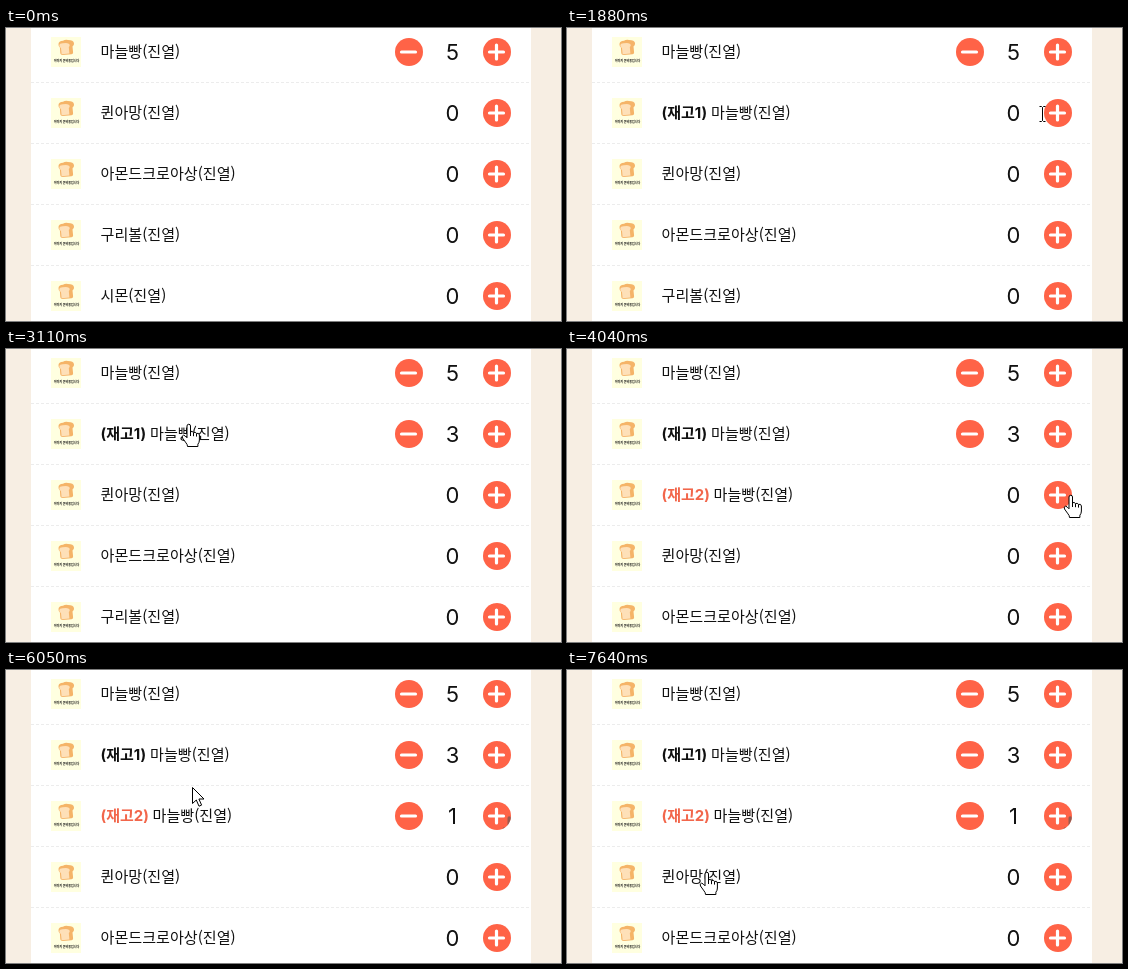
Write an HTML page that moves like this. It is 555 px wide and 293 px high and loops after 8000 ms.

```html
<!DOCTYPE html>
<html lang="ko">
<head>
<meta charset="utf-8">
<style>
  html, body { margin: 0; width: 100%; height: 100%; overflow: hidden; background: #f7eee3; }
  svg { display: block; width: 555px; height: 293px; }
  text { fill: #111; font: 15.1px "Noto Sans CJK KR", "Noto Sans CJK", sans-serif; }
  .tag { font: 700 15px Inter, "Noto Sans CJK KR", "Noto Sans CJK", sans-serif; }
  .count { font: 22px Inter, sans-serif; text-anchor: middle; }
  .caption { font-size: 3px; font-weight: 900; text-anchor: middle; }
  .sign { stroke: #fff; stroke-width: 3.2; stroke-linecap: round; fill: none; }
  .cursor { fill: #fff; stroke: #000; stroke-linejoin: round; }
</style>
</head>
<body>
<svg viewBox="0 0 555 293">
  <defs>
    <g id="thumb">
      <rect x="45" y="-15" width="30" height="30" fill="#ffffe0"/>
      <path d="M52.500-8q0-3 4.500-3.200q2-1.300 5-.8q5.500 0 6 3.200q.3 2-1.500 3.200l.6 6q0 1.500-1.600 1.800l-9 .8q-2 0-2.200-1.800l-.4-5.600q-1.600-1-1.400-3.600z" fill="#f5b468"/>
      <path d="M53.300-6.500q.2-2.300 3.400-2.300q5.800-1 6.900 1.200q.5 1.700-.8 2.600l.6 6.400l-7.800.9l-.6-6.300q-1.700-.7-1.700-2.500z" fill="#fee0b8"/>
      <text class="caption" x="60.500" y="9.700">이미지 준비중입니다</text>
    </g>
    <g id="plus">
      <circle cx="491" r="14" fill="#ff6347"/>
      <path class="sign" d="M483.500 0h14M490.500-7v14"/>
    </g>
    <g id="minus">
      <circle cx="403" r="14" fill="#ff6347"/>
      <path class="sign" d="M395.500 0h14"/>
    </g>
    <path id="palm" d="M-1.500 13V2a1.750 1.750 0 0 1 3.500 0V8q1.600-1.600 3 .6q1.800-1 3 .8q2.600-.8 2.900 1.600V16q0 2.500-1.500 4.200V22.500H-1q0-2-1.500-3.600L-6 14q-1-2.400 1-2.800q1.400 0 3.500 2.600z"/>
    <clipPath id="disc"><circle cx="491" r="14"/></clipPath>
  </defs>
  <rect x="25" width="500" height="293" fill="#fff"/>
  <path d="M25 54.500h500m-500 61h500m-500 61h500m-500 61h500" stroke="#ececec" stroke-dasharray="3 2"/>
  <g id="list"></g>
  <g id="hand" class="cursor">
    <g transform="translate(-.5 -1)">
      <use href="#palm"/>
      <path d="M2 8v4M5 8.800v3.400M8 9.600v3" fill="none"/>
    </g>
  </g>
  <path id="arrow" class="cursor" d="M.5.5V16.500L4.300 13L7 19.200L9.600 18.100L6.900 12H12Z"/>
  <path id="beam" class="cursor" d="M-2.500-7.500h2l1 1 1-1h2M.5-6.500v13M-2.500 7.500h2l1-1 1 1h2" style="fill:none"/>
</svg>
<script>
const LOOP = 8000, ROW = 61, TOP = 24;
const $ = id => document.getElementById(id);

// from: time the row is inserted; clicks: times its count goes up
const items = [
  { name: '마늘빵', base: 5 },
  { name: '마늘빵', tag: '(재고1)', x: 144, from: 1200, clicks: [2280, 2420, 2560] },
  { name: '마늘빵', tag: '(재고2)', x: 146.5, from: 3180, clicks: [4310], color: '#f2664b', shade: 4510 },
  { name: '퀸아망' },
  { name: '아몬드크로아상' },
  { name: '구리볼' },
  { name: '시몬' }
];

// Cursor strokes: start, end, steps, then evenly spaced points
const strokes = [
  [130, 670, 9, [442, 241, 'arrow'], [300, 90, 'arrow'], [150, 1, 'arrow'], [94, 14, 'hand'], [102, 17, 'hand']],
  [1200, 1880, 10, [102, 17, 'hand'], [160, 25, 'hand'], [300, 50, 'arrow'], [425, 78, 'beam'], [475, 86, 'beam']],
  [2080, 2140, 2, [479, 84, 'hand'], [481, 84, 'hand']],
  [2700, 3030, 6, [455, 83, 'beam'], [300, 74, 'arrow'], [194, 70, 'arrow']],
  [3110, 3700, 8, [183, 76, 'hand'], [190, 78, 'hand'], [350, 115, 'arrow'], [509, 147, 'arrow']],
  [3840, 4170, 5, [510, 148, 'arrow'], [504, 147, 'hand'], [504, 147, 'hand'], [498, 147, 'hand']],
  [4510, 4700, 4, [488, 148, 'hand'], [400, 144, 'arrow'], [290, 139, 'arrow'], [204, 134, 'arrow']],
  [4765, 4900, 3, [201, 134, 'arrow'], [194, 134, 'arrow']],
  [5040, 5250, 3, [193, 134, 'arrow'], [192, 133, 'arrow']],
  [5650, 5710, 2, [187, 133, 'hand'], [187, 133, 'arrow']],
  [6050, 6250, 4, [186, 117, 'arrow'], [188, 70, 'arrow']],
  [6450, 6910, 7, [190, 66, 'arrow'], [175, 36, 'arrow'], [152, 14, 'arrow']],
  [7170, 7240, 2, [147, 10, 'hand'], [146, 14, 'arrow']],
  [7380, 7640, 5, [146, 40, 'arrow'], [141, 110, 'arrow'], [138, 170, 'arrow'], [140, 203, 'hand']]
];

for (const item of items) {
  const row = document.createElementNS('http://www.w3.org/2000/svg', 'g');
  row.innerHTML = `<use href="#thumb"/>
    ${item.tag ? `<text class="tag" x="94.500" y="5" style="fill:${item.color || '#111'}">${item.tag}</text>` : ''}
    <text x="${item.x || 94.5}" y="5">${item.name}(진열)</text>
    <use class="less" href="#minus"/>
    <text class="count" x="446.500" y="8"></text>
    <use href="#plus"/>
    ${item.shade ? '<g class="shade" clip-path="url(#disc)"><use href="#palm" x="503" fill="#555" fill-opacity=".6"/></g>' : ''}`;
  item.row = row;
  item.less = row.querySelector('.less');
  item.count = row.querySelector('.count');
  item.shadow = row.querySelector('.shade');
  $('list').append(row);
}

const show = (el, on) => { el.style.display = on ? '' : 'none'; };

function drawList(t) {
  let slot = 0;
  for (const { row, less, count, shadow, base = 0, from = 0, clicks = [], shade } of items) {
    show(row, t >= from);
    if (t < from) continue;
    row.setAttribute('transform', `translate(0 ${TOP + ROW * slot++})`);
    const n = base + clicks.filter(c => t >= c).length;
    if (count.textContent !== String(n)) count.textContent = n;
    show(less, n > 0);
    if (shadow) show(shadow, t >= shade);
  }
}

function cursorAt(t) {
  const stroke = strokes.filter(s => t >= s[0]).pop();
  if (!stroke) return null;
  const [start, end, steps, ...pts] = stroke;
  const done = Math.min(1, (t - start) / (end - start));
  const u = Math.floor(done * (steps - 1) + 1e-6) / (steps - 1) * (pts.length - 1);
  const i = Math.min(Math.floor(u), pts.length - 2), f = u - i;
  const [a, b] = [pts[i], pts[i + 1]];
  return {
    x: Math.round(a[0] + (b[0] - a[0]) * f),
    y: Math.round(a[1] + (b[1] - a[1]) * f),
    kind: (f < 0.5 ? a : b)[2]
  };
}

function drawCursor(t) {
  const c = cursorAt(t);
  for (const kind of ['hand', 'arrow', 'beam']) {
    const on = c !== null && c.kind === kind;
    show($(kind), on);
    if (on) $(kind).setAttribute('transform', `translate(${c.x} ${c.y})`);
  }
}

const began = performance.now();
function frame() {
  const t = (performance.now() - began) % LOOP;
  drawList(t);
  drawCursor(t);
  requestAnimationFrame(frame);
}
frame();
</script>
</body>
</html>
```
